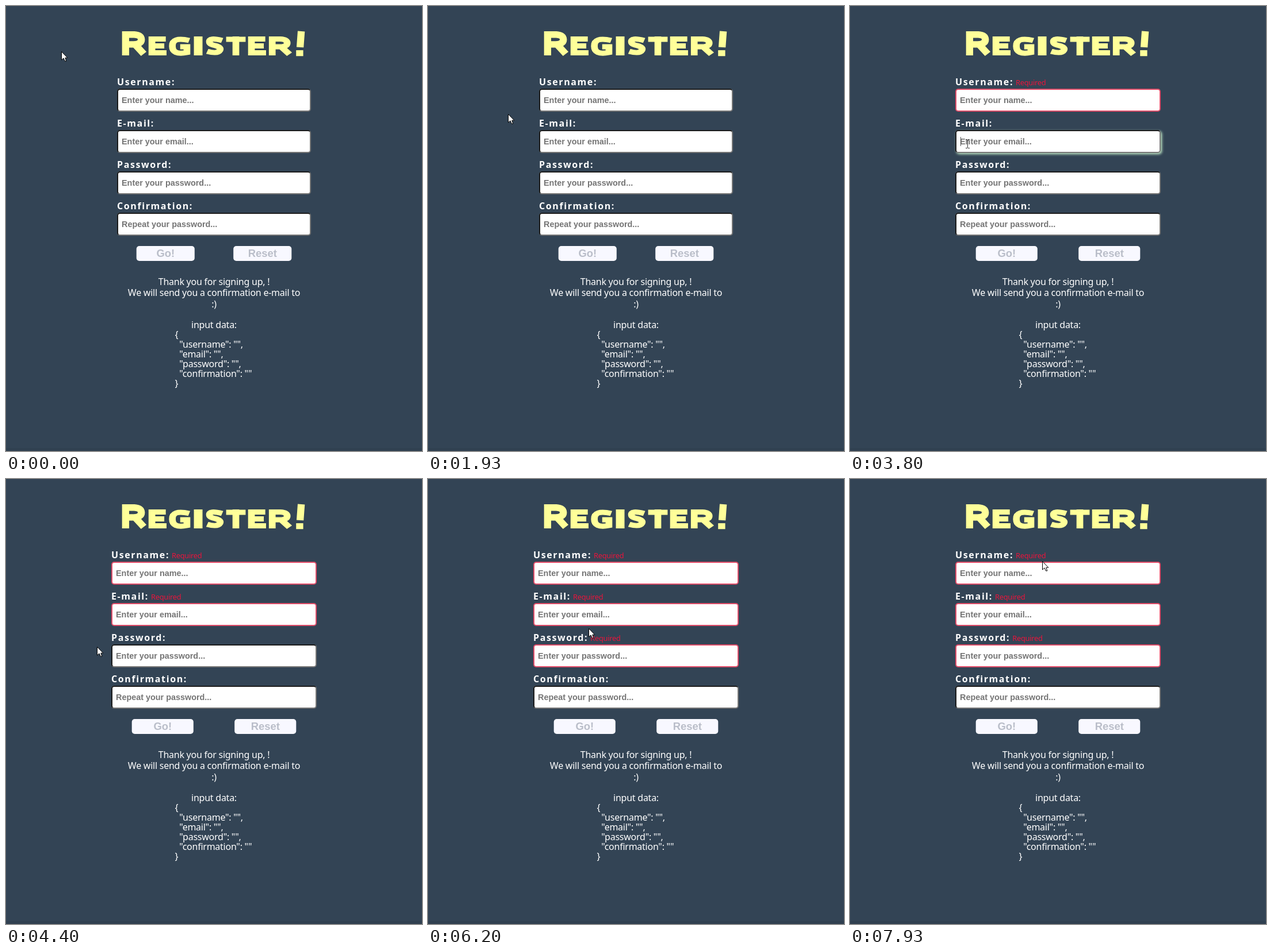
An HTML page with a canvas for the animation above (8000 ms loop, 723 by 775 pixels).

```html
<!DOCTYPE html>
<html lang="en">
<head>
<meta charset="utf-8">
<title>Register form</title>
<style>
html, body { margin: 0; width: 100%; height: 100%; overflow: hidden; background: #345; }
canvas { display: block; }
</style>
</head>
<body>
<canvas id="stage" width="723" height="775" role="img" aria-label="Register! form with validation"></canvas>
<script>
const ctx = document.getElementById('stage').getContext('2d');
const LOOP = 8000, FPS = 15, MID = 361.5, BOX_H = 40;
const SANS = '"Noto Sans", sans-serif', ARIAL = '"Liberation Sans", sans-serif';

// focus and blur are counted in steps of 1/15 s
const fields = [
  { label: 'Username:', hint: 'Enter your name...', focus: 42, blur: 50 },
  { label: 'E-mail:', hint: 'Enter your email...', focus: 57, blur: 64 },
  { label: 'Password:', hint: 'Enter your password...', focus: 73, blur: 80 },
  { label: 'Confirmation:', hint: 'Repeat your password...', focus: Infinity, blur: Infinity }
];
fields.forEach((f, i) => f.y = 144 + 72 * i);

// Pointer moves: first step, last step, x and y reached; it rests in between
const home = [96, 79];
const moves = [
  [9, 11, 112, 102], [18, 19, 125, 107], [21, 29, 139, 188], [29, 34, 216, 167],
  [42, 47, 151, 231], [50, 54, 205, 240], [57, 62, 130, 279], [64, 66, 158, 292],
  [66, 71, 205, 314], [73, 79, 137, 343], [83, 96, 321, 235], [96, 105, 300, 153],
  [105, 110, 334, 134], [118, 119, 334, 143]
];

// Title letters as pen strokes, 33 units high: width, path
const glyphs = {
  R: [31, 'M5 0V33M5 4.5H16Q25 5 25 11.5Q25 18 15 18H5M16 17L28 31'],
  E: [24, 'M4.5 0V33M4.5 4.5H23M4.5 16.5H21M4.5 28.5H24'],
  G: [28.5, 'M27 7Q4 0 4.5 17Q4.5 33 24 28V18H15'],
  I: [14, 'M6 0V33M8.5 0V33'],
  S: [24, 'M22 7Q4 1 5 9.5Q5 14 13 16Q21 19 19 24Q16 31 2 26'],
  T: [26, 'M0 5H26M13 0V33'],
  '!': [16, 'M9 0L7.5 22M7 26V34']
};
const arrow = new Path2D('M.5 .5V15L4 11.8L6.4 17H8.8L6.8 11.2H10.8Z');

function text(str, x, y, font, color, align = 'left', spacing = 0) {
  ctx.font = font;
  ctx.fillStyle = color;
  ctx.textAlign = align;
  ctx.letterSpacing = spacing + 'px';
  ctx.fillText(str, x, y);
  return ctx.measureText(str).width;
}

const copy = (str, x, y, align, size = 16, color = '#fff') =>
  text(str, x, y, size + 'px ' + SANS, color, align, -.25);

function rounded(x, y, w, h, r, color) {
  ctx.fillStyle = color;
  ctx.beginPath();
  ctx.roundRect(x, y, w, h, r);
  ctx.fill();
}

function title() {
  let x = 201;
  ctx.strokeStyle = '#ff9';
  ctx.lineWidth = 9;
  [...'REGISTER!'].forEach((ch, i) => {
    const [w, d] = glyphs[ch], tall = i === 0 || ch === '!';
    const sx = tall ? 1.37 : 1.3, sy = tall ? 1.27 : 1;
    ctx.save();
    ctx.translate(x, tall ? 44 : 53);
    ctx.scale(sx, sy);
    ctx.stroke(new Path2D(d));
    ctx.restore();
    x += w * sx + 4.3;
  });
}

function field(f, step, x, w) {
  const y = f.y, r = x + w, m = BOX_H / 2;
  const focused = step >= f.focus && step < f.blur, bad = step >= f.blur;
  const end = x + text(f.label, x, y - 6, 'bold 16px ' + SANS, '#fff', 'left', 1.6);
  if (bad) copy('Required', end + 4, y - 6, 'left', 12.8, '#eb143c');

  ctx.save();
  if (focused) {
    ctx.shadowColor = '#c4ecc8';
    ctx.shadowBlur = 4;
    ctx.shadowOffsetX = ctx.shadowOffsetY = 2;
  }
  rounded(x, y, w, BOX_H, 5, bad ? '#e04c68' : '#767676');
  ctx.restore();

  if (!bad) {
    // dark upper left half of the inset border
    ctx.save();
    ctx.beginPath();
    ctx.moveTo(x, y + BOX_H);
    ctx.lineTo(x, y);
    ctx.lineTo(r, y);
    ctx.lineTo(r - m, y + m);
    ctx.lineTo(x + m, y + m);
    ctx.clip();
    rounded(x, y, w, BOX_H, 5, '#1c1c1c');
    ctx.restore();
  }
  rounded(x + 2, y + 2, w - 4, BOX_H - 4, 3, '#fff');
  text(f.hint, x + 8, y + 25, 'bold 14.4px ' + ARIAL, '#757575');
  if (focused) {
    ctx.fillStyle = '#555';
    ctx.fillRect(x + 9, y + 12, 1, 16);
  }
}

function button(label, x, w) {
  rounded(x, 418, w, 26, 5, '#f8f8ff');
  text(label, x + w / 2, 437, 'bold 18.4px ' + ARIAL, '#babec9', 'center');
}

function messages() {
  copy('Thank you for signing up, !', MID, 486, 'center');
  copy('We will send you a confirmation e-mail to', MID, 505, 'center');
  copy(':)', MID, 525, 'center');
  copy('input data:', MID, 561, 'center');
  const data = { username: '', email: '', password: '', confirmation: '' };
  JSON.stringify(data, null, 2).split('\n')
    .forEach((line, i) => copy(line, 293.5, 578 + 17 * i, 'left'));
}

function pointerAt(step) {
  let [x, y] = home;
  for (const [from, to, tx, ty] of moves) {
    const k = Math.min(1, Math.max(0, (step - from) / (to - from)));
    x += (tx - x) * k;
    y += (ty - y) * k;
  }
  return [Math.round(x), Math.round(y)];
}

function pointer(step, left, width) {
  const [x, y] = pointerAt(step);
  const typing = x >= left && x < left + width && fields.some(f => y >= f.y && y < f.y + BOX_H);
  ctx.save();
  ctx.translate(x, y);
  if (typing) {
    ctx.fillStyle = '#333';
    ctx.fillRect(-1, -7, 1, 14);
    for (const dy of [-8, 7]) {
      ctx.fillRect(-4, dy, 3, 1);
      ctx.fillRect(0, dy, 3, 1);
    }
  } else {
    ctx.fillStyle = '#fff';
    ctx.fill(arrow);
    ctx.strokeStyle = '#000';
    ctx.lineWidth = 1;
    ctx.stroke(arrow);
  }
  ctx.restore();
}

function draw(now) {
  const step = Math.floor((now % LOOP) / 1000 * FPS + .06);
  const width = step >= fields[0].blur ? 357 : 337, left = MID - width / 2;
  ctx.fillStyle = '#345';
  ctx.fillRect(0, 0, 723, 775);
  ctx.fillStyle = '#304050';
  ctx.fillRect(0, 770, 723, 5);
  title();
  fields.forEach(f => field(f, step, left, width));
  button('Go!', left + width * .1, width * .3);
  button('Reset', left + width * .6, width * .3);
  messages();
  pointer(step, left, width);
}

const start = performance.now();
function tick() {
  draw(performance.now() - start);
  requestAnimationFrame(tick);
}
tick();
</script>
</body>
</html>
```
